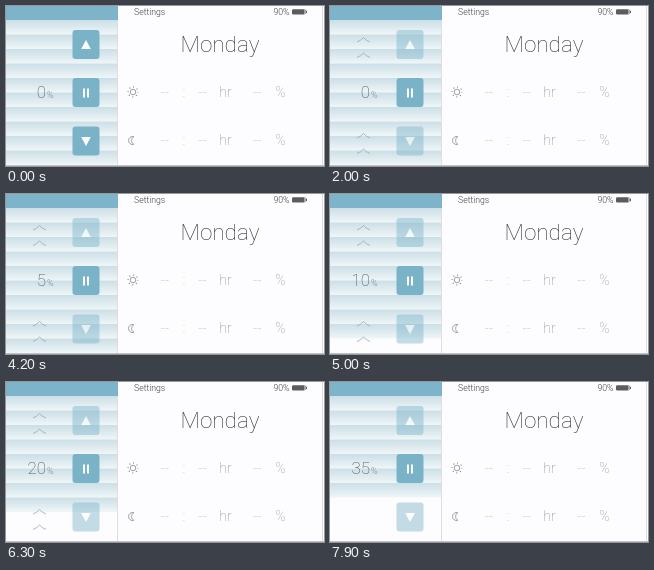
An HTML page for the animation above (8000 ms loop, 318 by 160 pixels).

```html
<!DOCTYPE html>
<html lang="en">
<head>
<meta charset="utf-8">
<title>Blind control</title>
<style>
  html, body { margin: 0; width: 100%; height: 100%; overflow: hidden; background: #fdfcfe; }
  svg { display: block; width: 100vw; height: 100vh; font-family: Roboto, "Open Sans", sans-serif; }
  .thin { font-weight: 100; }
  .light { font-weight: 300; }
  .end { text-anchor: end; }
  .mid { text-anchor: middle; }
  .button { fill: #7ab3c8; }
  .icon { fill: #fdfefe; }
  .line { fill: none; stroke: #9aa9b0; stroke-width: .8; }
  .dim { animation: dim 8s linear infinite; }
  .arrows { animation: arrows 8s linear infinite; }
  .pressed { animation: pressed 8s linear infinite; }
  @keyframes dim {
    0%, 13.75% { opacity: 1; }
    23.75%, 100% { opacity: .45; }
  }
  @keyframes arrows {
    0%, 6.25% { opacity: 0; }
    11.25%, 88.5% { opacity: 1; }
    97.5%, 100% { opacity: 0; }
  }
  @keyframes pressed {
    0%, 6.25% { fill: #fdfefe; }
    11.25%, 14.5% { fill: #f3eba6; }
    22%, 100% { fill: #fdfefe; }
  }
</style>
</head>
<body>
<svg viewBox="0 0 318 160" preserveAspectRatio="none">
  <defs>
    <linearGradient id="shade" x1="0" y1="0" x2="0" y2="1">
      <stop offset="0" stop-color="#cbdfe6"/>
      <stop offset=".5" stop-color="#ddeaef"/>
      <stop offset="1" stop-color="#eff6f8"/>
    </linearGradient>
    <path id="up" class="line" d="M27 36 Q31 34.5 33.5 31.5 Q36 34.5 40 36"/>
    <rect id="key" class="button" x="66.5" width="27" height="29" rx="3"/>
    <g id="row" fill="#aaa" font-size="14" class="thin mid">
      <text x="159">--</text>
      <text x="178">:</text>
      <text x="196.500">--</text>
      <text x="219.500" fill="#888">hr</text>
      <text x="251.500">--</text>
      <text x="274.500" fill="#999">%</text>
    </g>
  </defs>
  <rect width="318" height="160" fill="#fdfcfe"/>

  <g id="slats"></g>
  <path d="M111.500 14V159M316.500 0V159" stroke="#dedee2"/>
  <rect width="112" height="14" fill="#7db4c9"/>
  <path d="M0 159.500H318" stroke="#c3c1c8"/>

  <g class="arrows">
    <use href="#up"/>
    <use href="#up" y="15.500"/>
    <use href="#up" y="96"/>
    <use href="#up" y="111.500"/>
  </g>

  <g class="dim">
    <use href="#key" y="24"/>
    <path class="icon pressed" d="M80 34L84.800 43H75.200Z"/>
  </g>
  <use href="#key" y="72"/>
  <path class="icon" d="M77 82.500h2v9h-2zM81 82.500h2v9h-2z"/>
  <g class="dim">
    <use href="#key" y="120.500"/>
    <path class="icon" d="M75.200 131H84.800L80 140Z"/>
  </g>

  <text id="count" class="thin end" x="40" y="92" font-size="17" fill="#454d51">0</text>
  <text class="light" x="41" y="92" font-size="9" fill="#818a8f">%</text>

  <g class="light" font-size="8.700" fill="#444">
    <text x="128" y="9">Settings</text>
    <text class="end" x="283.500" y="9.200">90%</text>
  </g>
  <rect x="286" y="3.200" width="13" height="5.300" rx="1.200" fill="#5c5c60"/>
  <rect x="298" y="3.700" width="2" height="4.300" fill="#a8a8ac"/>
  <rect x="300" y="4.700" width="1" height="2.300" fill="#5c5c60"/>
  <text class="thin mid" x="214" y="46" font-size="22.500" fill="#333">Monday</text>

  <use href="#row" y="91"/>
  <use href="#row" y="139"/>
  <g fill="none" stroke="#888" stroke-width=".8">
    <circle cx="127" cy="86" r="2.800"/>
    <circle cx="127" cy="86" r="4.900" stroke-width="1.200" stroke-dasharray="1 2.848" stroke-dashoffset=".5"/>
    <path d="M127.800 130.700A4 4 0 1 0 127.800 138.300A4.400 4.400 0 0 1 127.800 130.700Z"/>
  </g>
</svg>
<script>
  const LOOP = 8000, SLATS = 10, TOP = 14, PITCH = 14.5;
  // Each entry opens the blind another 5 %.
  const steps = [3400, 4300, 5200, 6000, 6500, 6950, 7450];
  const count = document.getElementById("count");
  const group = document.getElementById("slats");

  const slats = Array.from({ length: SLATS }, (_, i) => {
    const slat = document.createElementNS("http://www.w3.org/2000/svg", "rect");
    const box = { y: TOP + i * PITCH, width: 111, height: PITCH, fill: "url(#shade)" };
    for (const name in box) slat.setAttribute(name, box[name]);
    return group.appendChild(slat);
  });

  function draw() {
    const time = performance.now() % LOOP;
    const percent = 5 * steps.filter(start => time >= start).length;
    const shown = SLATS - Math.floor(percent / 10);
    count.textContent = percent;
    slats.forEach((slat, i) => slat.setAttribute("visibility", i < shown ? "visible" : "hidden"));
    requestAnimationFrame(draw);
  }
  draw();
</script>
</body>
</html>
```
